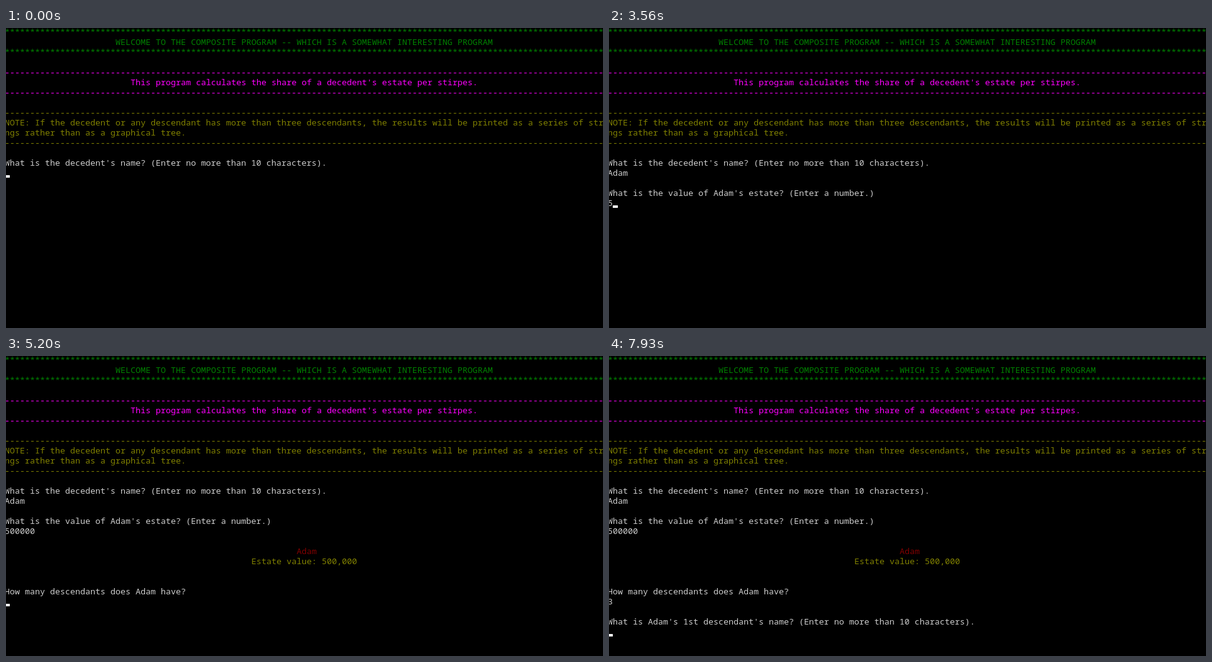
An HTML page with a canvas for the animation above (8 s loop, 949 px wide and 477 px high).

```html
<!DOCTYPE html>
<html lang="en">
<head>
<meta charset="utf-8">
<title>Console session</title>
<style>
html, body { margin: 0; width: 100%; height: 100%; overflow: hidden; background: #000; }
canvas { display: block; }
</style>
</head>
<body>
<canvas id="screen" width="949" height="477"></canvas>
<script>
const ctx = document.getElementById('screen').getContext('2d', { alpha: false });
const LOOP = 8000, COLS = 120, CELL_W = 8, CELL_H = 16, OFFSET = -2;
const BLINK = 532, FIRST_BLINK = 460;
const GREEN = '#008000', PINK = '#ff00ff', OLIVE = '#808000', RED = '#800000', TEXT = '#cccccc';
let time, row;

// Prints at the current row, wrapping at the console width.
function print(color, text, col = 0) {
  ctx.fillStyle = color;
  for (let i = 0; i < text.length; i += COLS) {
    ctx.fillText(text.slice(i, i + COLS), OFFSET + col * CELL_W, OFFSET + row * CELL_H + 13);
    row++;
  }
}

function center(color, text) {
  print(color, text, Math.floor((COLS - text.length) / 2));
}

function rule(color, mark) {
  print(color, mark.repeat(COLS));
}

const blinksAt = t => Math.floor((t - FIRST_BLINK) / BLINK);

// A key press lights the cursor until the next blink; a fresh prompt skips one blink.
function drawCursor(start, pressed) {
  const blinks = pressed.length
    ? blinksAt(time) - blinksAt(pressed.at(-1))
    : Math.max(0, blinksAt(time) - blinksAt(start) - 1);
  if (blinks % 2) return;
  ctx.fillStyle = '#fff';
  ctx.fillRect(OFFSET + pressed.length * CELL_W, OFFSET + (row + 1) * CELL_H - 4, CELL_W, 4);
}

// Asks a question, types the answer and returns whether it has been entered.
function ask(start, question, answer, keyTimes, end) {
  print(TEXT, question);
  const pressed = keyTimes.filter(t => t <= time);
  if (time < end) drawCursor(start, pressed);
  print(TEXT, answer.slice(0, pressed.length));
  return time >= end;
}

function session() {
  row = 0;
  rule(GREEN, '*');
  center(GREEN, 'WELCOME TO THE COMPOSITE PROGRAM -- WHICH IS A SOMEWHAT INTERESTING PROGRAM');
  rule(GREEN, '*');
  row++;
  rule(PINK, '-');
  center(PINK, "This program calculates the share of a decedent's estate per stirpes.");
  rule(PINK, '-');
  row++;
  rule(OLIVE, '-');
  print(OLIVE, 'NOTE: If the decedent or any descendant has more than three descendants, ' +
    'the results will be printed as a series of strings rather than as a graphical tree.');
  rule(OLIVE, '-');
  row++;
  if (!ask(-100, "What is the decedent's name? (Enter no more than 10 characters).",
    'Adam', [770, 1150, 1150, 1300], 1760)) return;
  row++;
  if (!ask(1760, "What is the value of Adam's estate? (Enter a number.)",
    '500000', [3560, 3960, 4110, 4430, 4570, 4650], 5200)) return;
  row++;
  center(RED, 'Adam');
  center(OLIVE, 'Estate value: 500,000');
  row += 2;
  if (!ask(5200, 'How many descendants does Adam have?', '3', [6680], 6820)) return;
  row++;
  ask(6820, "What is Adam's 1st descendant's name? (Enter no more than 10 characters).",
    '', [], LOOP);
}

function draw() {
  time = performance.now() % LOOP;
  ctx.fillStyle = '#000';
  ctx.fillRect(0, 0, 949, 477);
  ctx.font = `${CELL_W / 0.6}px "Noto Sans Mono", "DejaVu Sans Mono", monospace`;
  session();
  requestAnimationFrame(draw);
}
draw();
</script>
</body>
</html>
```
